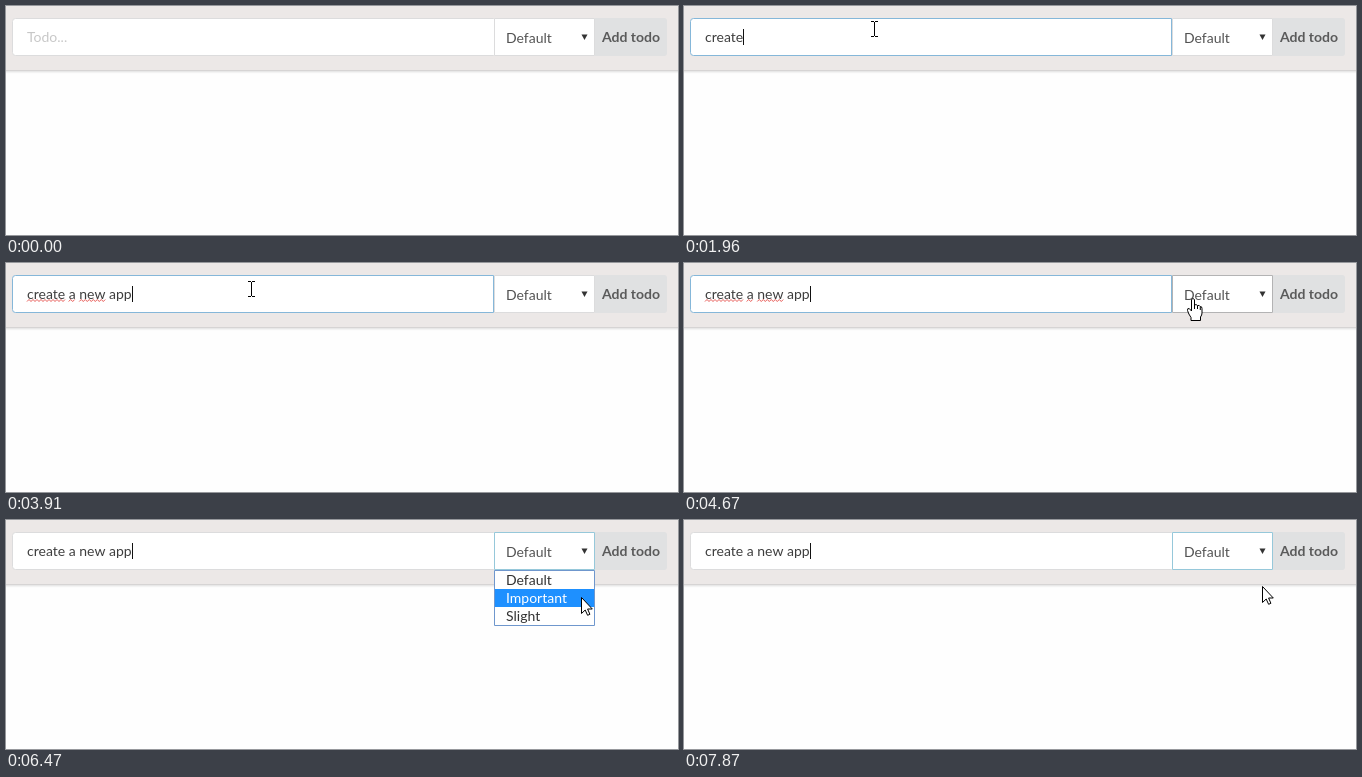
Recreate the animation shown at these times as an HTML page with a canvas. Size 672 px wide and 229 px high, loop 8 s.

```html
<!DOCTYPE html>
<html lang="en">
<head>
<meta charset="utf-8">
<title>Todo form</title>
<style>
html, body { margin: 0; width: 100%; height: 100%; overflow: hidden; background: #fefefe; }
canvas { display: block; }
</style>
</head>
<body>
<canvas id="stage" width="672" height="229"></canvas>
<script>
const ctx = document.getElementById('stage').getContext('2d');
const LOOP = 8000, POINTER_STEP = 78;
const TODO = 'create a new app';
const OPTIONS = ['Default', 'Important', 'Slight'];
const ENTER = 70, FOCUS = 560, TYPE = 1260, KEY_DELAY = 134, OPEN = 5140, CLOSE = 7870;
const GREY = '#dcdcdd', BLUE = '#85b7d9', TEAL = '#96c8da';

// The pointer enters here, then glides from stop to stop
const ENTRY = { x: 449, y: 178 };
const GLIDES = [
  { start: ENTER, end: 226, x: 190, y: 23 },
  { start: 3810, end: 4060, x: 407, y: 36 },
  { start: 4140, end: 4820, x: 544, y: 34 },
  { start: 5440, end: 6070, x: 575, y: 63 },
  { start: 6260, end: 6710, x: 575, y: 95 },
  { start: 6870, end: 7390, x: 578, y: 66 }
];

const ARROW = new Path2D('M.5.5V16.5L4.2 13L6.6 18.3L8.9 17.3L6.6 12H11.3Z');
const HAND = new Path2D('M-1.5 1.5Q0-.5 1.5 1.5V7Q3.3 5.8 4.5 7.6Q6.3 6.7 7.3 8.6' +
  'Q9 8.2 9 10.5V15Q9 17 7.5 19V22.5H-2V19.5Q-4.5 16-5.5 12.5Q-5.8 10-3.8 10.5L-1.5 13Z');
const KNUCKLES = new Path2D('M1.5 7V11M4.5 7.6V11M7.3 8.6V12');
const TRIANGLE = new Path2D('M575.5 28.5H581.5L578.5 34Z');

function rect(x, y, w, h, color) {
  ctx.fillStyle = color;
  ctx.fillRect(x, y, w, h);
}

function rounded(x, y, w, h, radii, fill, stroke) {
  ctx.beginPath();
  ctx.roundRect(x, y, w, h, radii);
  ctx.fillStyle = fill;
  ctx.fill();
  if (stroke) {
    ctx.strokeStyle = stroke;
    ctx.stroke();
  }
}

function label(str, x, y, color, weight = 400) {
  ctx.font = `${weight} 14px Lato, sans-serif`;
  ctx.fillStyle = color;
  ctx.fillText(str, x, y);
}

function textWidth(str) {
  ctx.font = '400 14px Lato, sans-serif';
  return ctx.measureText(str).width;
}

function pointerAt(t) {
  if (t < ENTER) return null;
  const time = t - (t - ENTER) % POINTER_STEP;
  let { x, y } = ENTRY;
  for (const glide of GLIDES) {
    const p = Math.min(1, Math.max(0, (time - glide.start) / (glide.end - glide.start)));
    const eased = p * p * (3 - 2 * p);
    x += (glide.x - x) * eased;
    y += (glide.y - y) * eased;
  }
  return { x: Math.round(x), y: Math.round(y) };
}

function squiggle(x, width) {
  ctx.beginPath();
  ctx.moveTo(x, 38.5);
  for (let d = 2; d <= width; d += 2) ctx.lineTo(x + d, d % 4 ? 36.5 : 38.5);
  ctx.strokeStyle = 'rgba(225, 50, 45, .8)';
  ctx.stroke();
}

function drawInput(t) {
  const focused = t >= FOCUS && t < OPEN;
  const border = !focused ? GREY : t < FOCUS + POINTER_STEP ? '#b1cadb' : BLUE;
  rounded(6.5, 12.5, 481, 37, [3, 0, 0, 3], '#fff', border);
  if (!focused) rect(487, 13, 1, 36, '#fff');

  const typed = TODO.slice(0, Math.max(0, Math.floor((t - TYPE) / KEY_DELAY) + 1));
  if (typed) label(typed, 21, 36, 'rgba(0, 0, 0, .76)');
  else label('Todo...', 21, 36, focused ? 'rgba(115, 115, 115, .87)' : 'rgba(191, 191, 191, .87)');

  if (focused) {
    for (const word of typed.matchAll(/\S+(?= )/g)) {
      squiggle(21 + textWidth(typed.slice(0, word.index)), textWidth(word[0]));
    }
  }
  if (t >= FOCUS) rect(Math.round(21 + textWidth(typed)), 23, 1, 16, '#111');
}

function drawSelect(t, pointer) {
  const hover = pointer && pointer.x >= 488 && pointer.y < 50;
  const border = t >= OPEN ? TEAL : hover ? '#b3b3b4' : GREY;
  rounded(488.5, 12.5, 100, 37, 0, '#fff', border);
  label('Default', 500, 37, 'rgba(0, 0, 0, .68)');
  ctx.fillStyle = '#333';
  ctx.fill(TRIANGLE);
}

function drawOptions(pointer) {
  rounded(488.5, 50.5, 100, 55, 0, '#fff', '#6f97cd');
  const active = Math.max(0, Math.floor((pointer.y - 51) / 18));
  OPTIONS.forEach((name, i) => {
    if (i === active) rect(489, 51 + i * 18, 99, 18, '#1e90ff');
    label(name, 500, 65 + i * 18, i === active ? '#fff' : '#333');
  });
}

function drawPointer({ x, y }) {
  if (y < 50 && x < 488) {
    rect(x, y - 7, 1, 14, '#000');
    for (const dy of [-8, 7]) {
      rect(x - 3, y + dy, 3, 1, '#000');
      rect(x + 1, y + dy, 3, 1, '#000');
    }
    return;
  }
  const hand = y < 50;
  const shape = hand ? HAND : ARROW;
  ctx.save();
  ctx.translate(x, y);
  ctx.fillStyle = '#fff';
  ctx.strokeStyle = '#000';
  ctx.fill(shape);
  ctx.stroke(shape);
  if (hand) ctx.stroke(KNUCKLES);
  ctx.restore();
}

function drawHeader() {
  ctx.save();
  ctx.shadowColor = 'rgba(34, 36, 38, .15)';
  ctx.shadowOffsetY = 1;
  ctx.shadowBlur = 2;
  rect(-5, 0, 682, 65, '#d6d4d4');
  ctx.restore();
  rect(0, 0, 672, 64, '#ece8e7');
}

function draw(t) {
  const pointer = pointerAt(t);
  rect(0, 0, 672, 229, '#fefefe');
  drawHeader();
  drawInput(t);
  drawSelect(t, pointer);
  rounded(589, 12, 72, 38, [0, 3, 3, 0], '#e0e1e2');
  label('Add todo', 596, 36, 'rgba(0, 0, 0, .6)', 700);
  if (t >= OPEN && t < CLOSE) drawOptions(pointer);
  if (pointer) drawPointer(pointer);
}

function tick() {
  draw(performance.now() % LOOP);
  requestAnimationFrame(tick);
}
tick();
</script>
</body>
</html>
```
